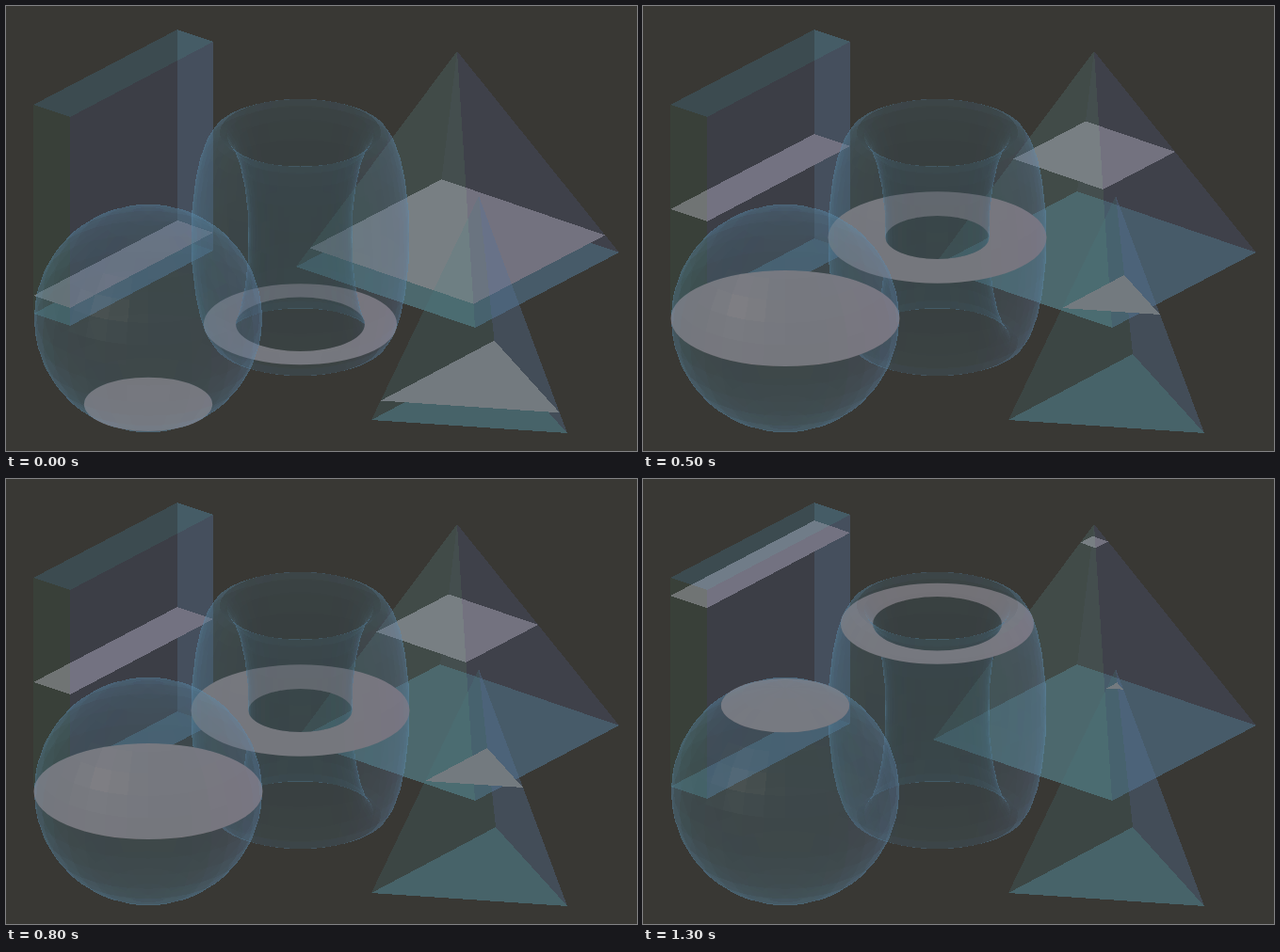
An HTML page that plays this animation: 670x473 px, repeating every 1.5 s.

```html
<!DOCTYPE html>
<html lang="en">
<head>
<meta charset="utf-8">
<title>Plane sections of solids</title>
<style>
html, body { margin: 0; width: 100%; height: 100%; overflow: hidden; background: #393834; }
svg { display: block; width: 670px; height: 473px; }
</style>
</head>
<body>
<svg id="stage" viewBox="0 0 670 473" xmlns="http://www.w3.org/2000/svg"></svg>
<script>
const SIN = 0.42, COS = 0.9075;          // camera elevation
const LEVELS = [0.086, 0.5, 0.914];      // height of the cutting plane
const HOLD = 500;
const SECTION = "rgb(126,121,126)";

const rgb = c => `rgb(${c.map(v => Math.max(0, Math.min(255, Math.round(v))))})`;
const mix = (a, b, t) => a.map((v, i) => v + (b[i] - v) * t);
const poly = (pts, color, alpha) =>
  `<polygon points="${pts.map(p => p.map(v => v.toFixed(1)).join()).join(" ")}"` +
  ` fill="${color}" fill-opacity="${alpha.toFixed(3)}" shape-rendering="crispEdges"/>`;
const oval = (x, y, r) => {
  const ry = r * SIN;
  return `M${x - r} ${y}a${r} ${ry} 0 1 0 ${2 * r} 0a${r} ${ry} 0 1 0 ${-2 * r} 0z`;
};
const section = d => `<path d="${d}" fill="${SECTION}" fill-rule="evenodd"/>`;

// Flat-sided solid: sides are [corner, next corner, colour, alpha], back to front.
function drawSolid({ base, top, sides, floor, lid }, level) {
  const ring = t => base.map((p, i) => mix(p, top[i], t));
  const part = (lo, hi) => {
    const a = ring(lo), b = ring(hi);
    return sides.map(([i, j, color, alpha]) => poly([a[i], a[j], b[j], b[i]], rgb(color), alpha));
  };
  const low = part(0, level), high = part(level, 1);
  const out = [poly(base, rgb(floor), 0.4), ...low];
  out.push(poly(ring(level), SECTION, 1), ...high);
  if (lid) out.push(poly(top, rgb(lid), 0.25));
  return out.join("");
}

// Surface of revolution; the profile is an ellipse with radius mid + wide*cos, height tall*sin.
function drawRound(s, level) {
  const cut = Math.asin(2 * level - 1), half = Math.PI / 2;
  const sheets = s.mid ? [1, -1] : [1];

  const point = (phi, theta, side) => {
    const r = s.mid + side * s.wide * Math.cos(phi);
    return [s.x + r * Math.cos(theta), s.y + r * Math.sin(theta) * SIN - s.tall * Math.sin(phi) * COS];
  };

  const part = (lo, hi) => {
    const faces = [];
    for (const side of sheets) {
      for (let i = 0; i < s.rows; i++) {
        const p0 = -half + i * Math.PI / s.rows, p1 = p0 + Math.PI / s.rows;
        const a = Math.max(p0, lo), b = Math.min(p1, hi);
        if (b - a < 1e-4) continue;
        for (let j = 0; j < s.cols; j++) {
          const t0 = j * 2 * Math.PI / s.cols, t1 = (j + 1) * 2 * Math.PI / s.cols;
          const n = normal((p0 + p1) / 2, (t0 + t1) / 2, side);
          const pts = [point(a, t0, side), point(a, t1, side), point(b, t1, side), point(b, t0, side)];
          faces.push({ depth: n[1] * COS + n[2] * SIN, pts, n, side });
        }
      }
    }
    return faces.sort((f, g) => (f.depth > 0) - (g.depth > 0)).map(shade).join("");
  };

  const normal = (phi, theta, side) => {
    const out = side * Math.cos(phi) / s.wide, up = Math.sin(phi) / s.tall;
    const len = Math.hypot(out, up);
    return [out * Math.cos(theta) / len, out * Math.sin(theta) / len, up / len];
  };

  const shade = ({ depth, pts, n, side }) => {
    const rim = Math.pow(1 - Math.abs(depth), 3), up = Math.abs(n[2]);
    const pink = depth > 0 && side > 0 ? Math.max(0, n[0] - 0.35) : 0;
    let color = side < 0
      ? [46 + 14 * up, 60 + 25 * up, 68 + 32 * up]
      : [68 + 14 * up + 45 * pink, 105 + 20 * up - 20 * pink, 118 + 30 * up + 35 * pink];
    color = mix(color, [94, 144, 178], rim);
    let alpha = 0.15 + 0.2 * rim;
    if (s.glint) {
      const shine = Math.max(0, -0.38 * n[0] + 0.91 * depth + 0.1 * (n[2] * COS - n[1] * SIN));
      const hot = Math.pow(shine, 40);
      color = mix(color, [150, 165, 160], hot);
      alpha += 0.08 * hot;
    }
    return poly(pts, rgb(color), alpha);
  };

  const y = s.y - s.tall * Math.sin(cut) * COS, reach = s.wide * Math.cos(cut);
  const d = oval(s.x, y, s.mid + reach) + (s.mid ? oval(s.x, y, s.mid - reach) : "");
  return part(-half, cut) + section(d) + part(cut, half);
}

const FLOOR = [92, 149, 170];

const boxBase = [[29, 327], [182, 247], [220, 260], [68, 340]];
const box = {
  base: boxBase,
  top: boxBase.map(([x, y]) => [x, y - 222]),
  sides: [
    [1, 2, [98, 130, 150], 0.3],
    [3, 0, [57, 96, 77], 0.2],
    [2, 3, [72, 86, 142], 0.2]
  ],
  floor: FLOOR,
  lid: [69, 132, 164]
};

const pyramid = {
  base: [[308, 277], [461, 197], [651, 262], [498, 342]],
  top: Array(4).fill([479, 48]),
  sides: [
    [1, 2, [77, 76, 92], 0.2],
    [3, 0, [97, 151, 152], 0.2],
    [2, 3, [72, 86, 132], 0.2]
  ],
  floor: FLOOR
};

const tetra = {
  base: [[388, 440], [520, 370], [596, 454]],
  top: Array(3).fill([502, 202]),
  sides: [
    [1, 2, [102, 101, 177], 0.2],
    [2, 0, [72, 126, 132], 0.2]
  ],
  floor: FLOOR
};

const ring = { x: 312.5, y: 246, mid: 85.5, wide: 30.5, tall: 122.75, rows: 12, cols: 60 };
const ball = { x: 151, y: 332, mid: 0, wide: 121.5, tall: 121.5, rows: 16, cols: 32, glint: true };

const scenes = LEVELS.map(level =>
  drawSolid(box, level) + drawSolid(pyramid, level) + drawRound(ring, level) +
  drawRound(ball, level) + drawSolid(tetra, level));

const stage = document.getElementById("stage");
let shown = -1;

function update(time) {
  const step = Math.floor(time / HOLD) % scenes.length;
  if (step !== shown) {
    stage.innerHTML = scenes[step];
    shown = step;
  }
}

const start = performance.now();
function tick() {
  update(performance.now() - start);
  requestAnimationFrame(tick);
}
tick();
</script>
</body>
</html>
```
